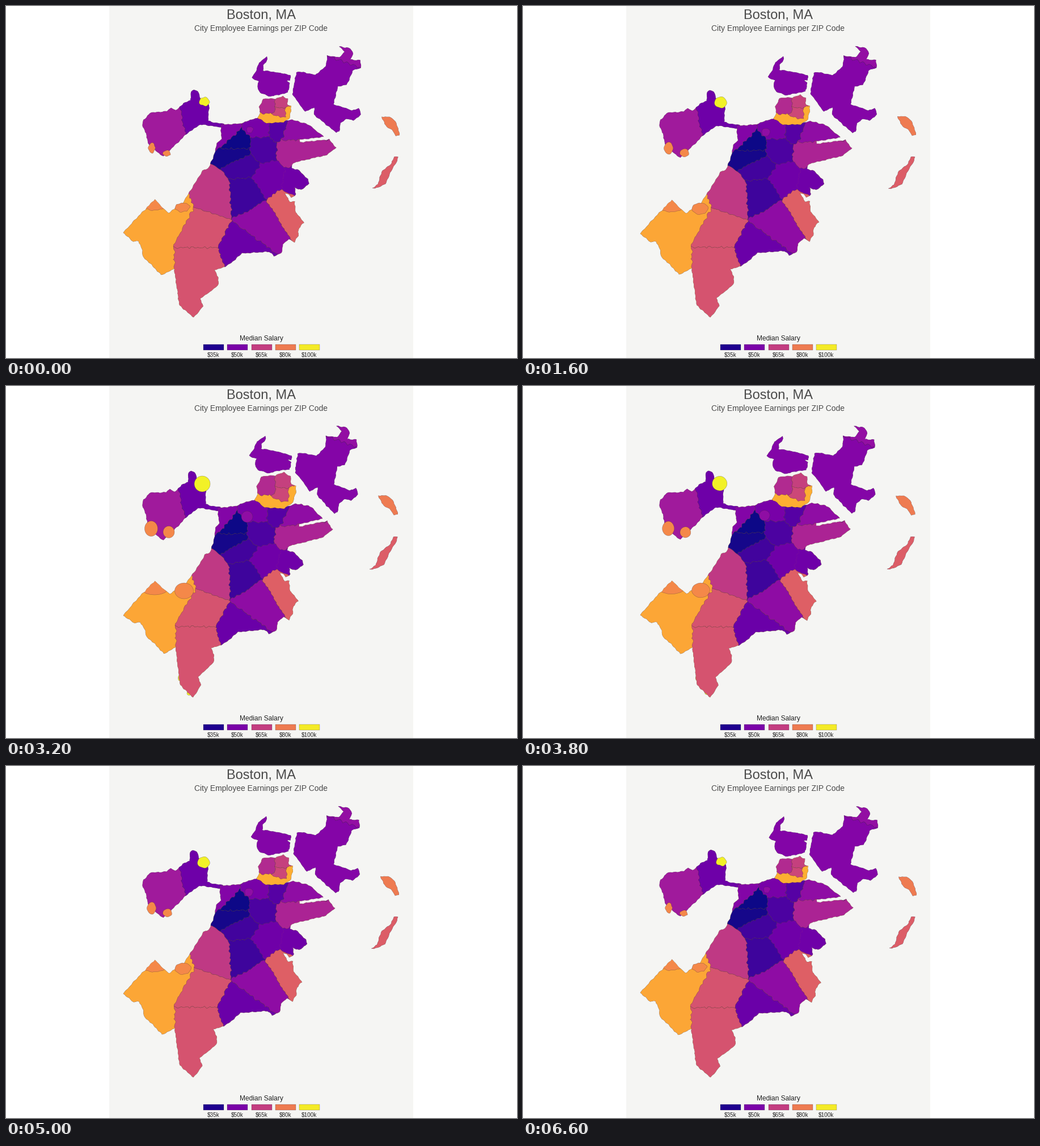
A matplotlib script for the animation above (6.8 s loop, 901 by 622 pixels).

```python
import numpy as np
import matplotlib.pyplot as plt
from matplotlib.animation import FuncAnimation
from matplotlib.patches import Polygon, Rectangle

W, H, DPI = 901, 622, 64
FRAMES, STEP_MS, LAST = 34, 200, 16
PX = 72 / DPI  # points per pixel
INK = (0.22, 0.16, 0.24, 0.55)

fig = plt.figure(figsize=(W / DPI, H / DPI), dpi=DPI, facecolor="white")
ax = fig.add_axes([0, 0, 1, 1])
ax.set(xlim=(0, W), ylim=(H, 0))
ax.axis("off")
ax.add_patch(Rectangle((182, 0), 536, H, color="#f5f5f3", lw=0))

# Key points of the distortion: x, y, dx, dy
PULLS = np.array([
    (207, 400, 0, 5), (262, 342, 0, 3), (240, 442, 6, 0), (293, 467, 3, -3),
    (331, 550, -1, 0), (374, 490, -8, -5), (387, 461, -7, -3),
    (470, 441, -9, -4), (525, 383, -10, -3), (534, 314, -10, 2),
    (503, 287, -8, 4), (582, 250, -6, 3), (470, 258, -3, 7), (494, 205, 2, 11),
    (505, 201, 6, 7), (503, 184, 9, 2), (488, 160, 2, -7), (444, 190, -5, 2),
    (501, 122, 2, 1), (505, 156, 5, -3), (527, 186, 8, 0), (626, 150, -6, 0),
    (590, 72, -5, -1), (331, 148, -5, 2), (240, 210, 0, 0), (277, 266, 0, 7),
    (370, 207, -5, 6), (424, 206, -8, 4), (367, 264, 0, 8), (389, 279, -2, 11),
    (452, 326, -6, 0), (400, 372, -3, 2), (334, 312, 6, 5),
    (646, 322, -5, 2), (691, 267, -1, 0), (662, 196, -6, -2),
], float)
KNOTS = PULLS[:, :2]


def kernel(p):
    d = np.linalg.norm(p[:, None] - KNOTS[None], axis=2) / 100
    return d ** 2 * np.log(np.maximum(d, 1e-9))


def affine(p):
    return np.column_stack([np.ones(len(p)), p / 100])


# Thin-plate spline through the key points
base = affine(KNOTS)
system = np.block([[kernel(KNOTS), base], [base.T, np.zeros((3, 3))]])
weights = np.linalg.solve(system, np.vstack([PULLS[:, 2:], np.zeros((3, 2))]))


def drift(p):
    return np.hstack([kernel(p), affine(p)]) @ weights


def wobble(p):
    """Ragged-border offset; depends on place only, so neighbours agree."""
    x, y = p.T
    return np.column_stack([
        1.3 * np.sin(0.62 * y + 0.2 * x) + 0.9 * np.sin(0.31 * y - 0.45 * x),
        1.3 * np.sin(0.6 * x - 0.23 * y) + 0.9 * np.sin(0.37 * x + 0.5 * y + 2)])


def dense(p, step=3):
    parts = []
    for a, b in zip(p, np.roll(p, -1, axis=0)):
        n = max(1, int(np.hypot(*(b - a)) / step))
        parts.append(a + (b - a) * np.arange(n)[:, None] / n)
    return np.vstack(parts)


def cell(box, seed, seeds):
    """Cut the box down to the points nearest to the seed."""
    poly = box
    for other in seeds:
        n = other - seed
        if not n.any():
            continue
        side = (poly - (other + seed) / 2) @ n
        kept = []
        for i in range(len(poly)):
            a, b, sa, sb = poly[i - 1], poly[i], side[i - 1], side[i]
            if (sa <= 0) != (sb <= 0):
                kept.append(a + (b - a) * sa / (sa - sb))
            if sb <= 0:
                kept.append(b)
        poly = np.array(kept)
    return poly


shapes = []


def add(color, start, move, edge=INK, width=0.45, clip=None):
    patch = Polygon(start, closed=True, fc=color, ec=edge, lw=width * PX,
                    joinstyle="round")
    ax.add_patch(patch)
    if clip:
        patch.set_clip_path(clip)
    shapes.append((patch, start, move))
    return patch


def land(outline, *zones):
    """Coast filled with zones (colour, seed, ...), each the area nearest its seeds."""
    coast = dense(np.array(outline, float))
    coast = coast + 0.4 * wobble(coast)
    shore = add(zones[0][0], coast, drift(coast), width=0.8)
    (x0, y0), (x1, y1) = coast.min(0) - 15, coast.max(0) + 15
    box = np.array([(x0, y0), (x1, y0), (x1, y1), (x0, y1)])
    seeds = np.array([s for zone in zones for s in zone[1:]], float)
    for color, *own in zones:
        edge = INK if len(own) == 1 else color
        for seed in np.array(own, float):
            p = dense(cell(box, seed, seeds))
            p = p + wobble(p)
            add(color, p, drift(p), edge, clip=shore)
    return shore


def swell(color, small, big, clip=None):
    """Ragged blob that grows into a clean ellipse (cx, cy, rx, ry)."""
    t = np.linspace(0, 2 * np.pi, 48, endpoint=False)
    ring = np.column_stack([np.cos(t), np.sin(t)])
    a, b = (np.array(e[:2]) + ring * e[2:] for e in (small, big))
    a = a + 0.5 * wobble(a)
    add(color, a, b - a, clip=clip)


# west
land([(240, 210), (243, 202), (254, 189), (284, 186), (291, 180), (300, 185),
      (313, 172), (326, 167), (326, 152), (331, 148), (338, 151), (343, 165),
      (358, 175), (356, 203), (370, 207), (385, 208), (385, 215), (343, 209),
      (320, 224), (277, 266), (252, 245), (247, 225)],
     ("#a01a9c", (283, 208)), ("#6e00a8", (340, 196)))
swell("#f48849", (257, 251, 6, 8.5), (256, 252, 11.5, 13.5))
swell("#f48849", (283, 260, 7, 5), (287, 258, 10, 10.5))
swell("#f2f127", (350, 169, 9, 7.5), (346, 173, 14, 14))

# north
land([(433, 127), (440, 118), (446, 101), (460, 90), (461, 94), (454, 104),
      (453, 114), (480, 118), (501, 122), (501, 131), (495, 132), (500, 137),
      (497, 153), (466, 160), (448, 153), (443, 143), (446, 133)],
     ("#8305a7", (470, 130)))
land([(512, 118), (518, 116), (545, 122), (564, 107), (567, 88), (588, 91),
      (597, 81), (588, 72), (607, 75), (612, 84), (607, 95), (624, 96),
      (626, 110), (612, 113), (601, 139), (585, 142), (577, 174), (600, 181),
      (610, 185), (622, 181), (626, 192), (612, 202), (601, 199), (589, 207),
      (588, 221), (582, 223), (543, 192), (544, 179), (527, 186), (505, 156)],
     ("#8405a7", (580, 120)), ("#930fa3", (598, 72)))

# mainland; the yellow blobs come out from under its coast
swell("#f2f127", (330, 538, 2, 3), (323, 543, 4, 3.5))
swell("#f2f127", (310, 515, 2, 4), (306, 516, 2.5, 5))
mainland = land(
    [(207, 400), (262, 342), (286, 366), (312, 348), (334, 312), (347, 291),
     (357, 287), (367, 264), (372, 243), (380, 235), (379, 210), (413, 208),
     (446, 197), (485, 205), (505, 201), (534, 210), (560, 231), (518, 236),
     (518, 241), (570, 236), (582, 250), (566, 263), (506, 277), (503, 287),
     (514, 289), (532, 306), (534, 314), (521, 325), (509, 321), (511, 333),
     (503, 339), (499, 332), (491, 331), (500, 346), (509, 346), (510, 364),
     (525, 383), (516, 393), (515, 406), (508, 417), (499, 412), (488, 421),
     (486, 436), (473, 442), (464, 434), (416, 437), (402, 450), (387, 461),
     (368, 466), (374, 479), (374, 494), (342, 518), (347, 531), (331, 550),
     (306, 529), (298, 474), (297, 464), (274, 475), (241, 442), (240, 428),
     (234, 415), (224, 416)],
    ("#fca636", (292, 366), (248, 459)), ("#6f00a8", (461, 304), (515, 313)),
    ("#d5536f", (345, 395)), ("#d5536f", (345, 459)), ("#bf3984", (366, 332)),
    ("#6a00a8", (416, 431)), ("#8e0ca4", (453, 381)), ("#de5f65", (495, 355)),
    ("#3e049c", (424, 328)), ("#42039d", (421, 280)), ("#16078a", (411, 258)),
    ("#0d0887", (411, 246)), ("#8305a7", (385, 217)), ("#7801a8", (448, 214)),
    ("#4c02a1", (450, 250)), ("#5601a4", (480, 214)), ("#8f0da4", (505, 222)),
    ("#ab2394", (505, 252)))
swell("#f48849", (261, 345, 26, 16), (262, 352, 28, 17), clip=mainland)
swell("#f48849", (311, 356, 13, 8), (314, 362, 16.5, 14))
swell("#8f0da4", (430, 219, 6, 5.5), (425, 231, 10, 10))

# downtown
land([(444, 197), (448, 190), (447, 178), (454, 164), (474, 164), (488, 160),
      (497, 164), (496, 175), (503, 177), (500, 198), (490, 205), (459, 207)],
     ("#fdae32", (461, 204), (484, 203), (499, 190)), ("#b12a90", (461, 176)),
     ("#c5407e", (488, 171)), ("#cc4778", (487, 189)))

# islands
land([(662, 196), (676, 196), (687, 204), (694, 228), (687, 229), (683, 221),
      (671, 213)], ("#ee7b51", (680, 212)))
land([(646, 322), (656, 315), (662, 294), (680, 278), (684, 267), (691, 266),
      (690, 273), (680, 289), (669, 314), (657, 320)], ("#dc5d67", (670, 295)))


def label(x, y, text, size, color="#222222"):
    ax.text(x, y, text, size=size * PX, color=color, ha="center", va="baseline",
            family="Liberation Sans", parse_math=False)


label(450, 23.5, "Boston, MA", 23.6, "#4a4a4a")
label(450, 44.3, "City Employee Earnings per ZIP Code", 13.9, "#4a4a4a")
label(450, 591, "Median Salary", 12)
LEGEND = {"$35k": "#1f008f", "$50k": "#7a02a8", "$65k": "#c33d80",
          "$80k": "#ee7b51", "$100k": "#f4eb27"}
for i, (text, color) in enumerate(LEGEND.items()):
    x = 348 + 42.25 * i
    ax.add_patch(Rectangle((x, 598), 36, 9.5, fc=color, ec=INK, lw=0.45 * PX))
    label(x + 18, 620.3, text, 10)


def draw(n):
    step = min(n, FRAMES - 1 - n)  # out and back
    u = (step / LAST) ** 1.5
    for patch, start, move in shapes:
        patch.set_xy(start + u * move)
    return [s[0] for s in shapes]


anim = FuncAnimation(fig, draw, frames=FRAMES, interval=STEP_MS, repeat=True,
                     repeat_delay=0)
plt.show()
```
